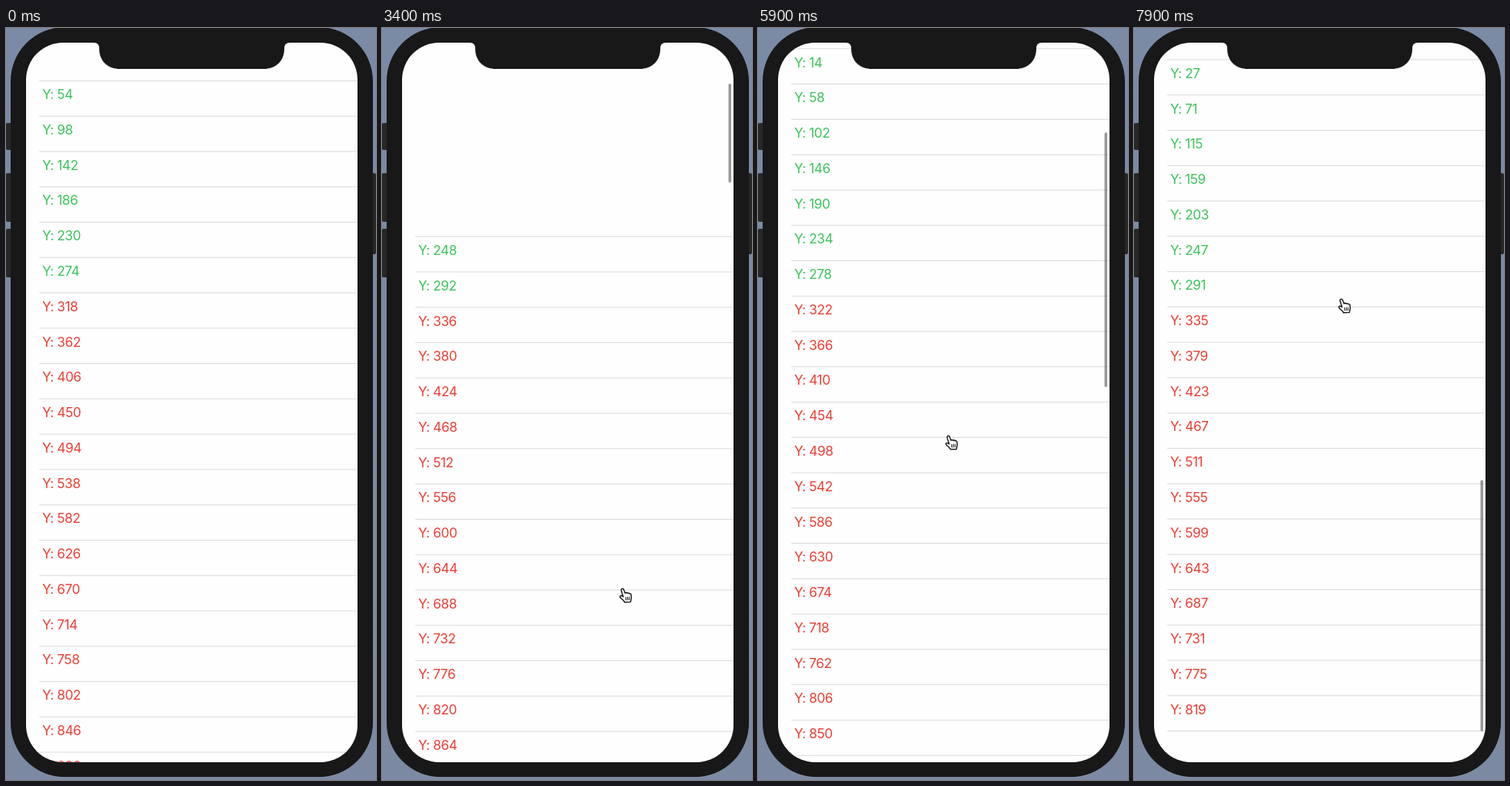
Write an HTML page with a canvas that moves like this. It is 480 px wide and 974 px high and loops after 8 s.

```html
<!DOCTYPE html>
<html lang="en">
<head>
<meta charset="utf-8">
<title>Scroll positions</title>
<style>
  html, body { margin: 0; width: 100%; height: 100%; overflow: hidden; background: #7b8ba4; }
  canvas { display: block; width: 480px; height: 974px; }
</style>
</head>
<body>
<canvas id="stage"></canvas>
<script>
const W = 480, H = 974, LOOP = 8000, STEP = 100;
const PT = 1.0402;                       // pixels per point
const SCREEN = { x: 26, y: 19, w: 430, h: 932, r: 48 };
const ROWS = 50, ROW = 44, FIRST = 54, LIMIT = 300;
const MAX = 1386, VIEW = 818;
const OMEGA = 8.58;                      // bounce stiffness
const BAR = { top: 72, bottom: 911, len: 330 };
const GRAB = 254, FLICK = 716;           // cursor heights where drags begin

const canvas = document.getElementById('stage');
const ctx = canvas.getContext('2d');
const dpr = window.devicePixelRatio || 1;
canvas.width = W * dpr;
canvas.height = H * dpr;

const clamp = (v, a = 0, b = 1) => Math.min(b, Math.max(a, v));
const part = (t, a, b) => clamp((t - a) / (b - a));
const smooth = u => u * u * (3 - 2 * u);
const mix = (a, b, u) => a + (b - a) * u;
const rubber = x => VIEW * (1 - 1 / (x * 0.55 / VIEW + 1));

function hermite(a, b, va, vb, sec, u) {
  const u2 = u * u, u3 = u2 * u;
  return a * (2 * u3 - 3 * u2 + 1) + b * (3 * u2 - 2 * u3) +
    sec * (va * (u3 - 2 * u2 + u) + vb * (u3 - u2));
}

const pullY = t => mix(GRAB, 735, smooth(part(t, 1900, 3400)));

// Scroll offset in points; negative means pulled past the top.
function offsetAt(t) {
  if (t < 1900) return 0;
  if (t < 4000) return -rubber((pullY(t) - GRAB) / PT);
  if (t < 5450) {
    const k = OMEGA * (t - 4000) / 1000;
    const pull = 194 * (1 + k) * Math.exp(-k);
    return pull < 0.3 ? 0 : -pull;
  }
  if (t < 5900) return hermite(0, 172, 0, 400, 0.45, part(t, 5450, 5900));
  if (t < 6283) return hermite(172, 410, 400, 2054, 0.383, part(t, 5900, 6283));
  const glide = 1437 - 545.4 * Math.exp(-2 * (t - 6600) / 1000);
  if (glide < MAX) return glide;
  const s = (t - 7785) / 1000;
  return MAX + 102 * s * Math.exp(-OMEGA * s);
}

function cursorAt(t) {
  if (t < 1000 || (t >= 4100 && t < 5100)) return null;
  if (t < 1900) {
    const u = smooth(part(t, 1500, 1900));
    return [mix(246, 250, u), mix(223, GRAB, u)];
  }
  if (t < 4100) return [mix(250, 316, smooth(part(t, 1900, 3400))), pullY(t)];
  if (t < 6283) {
    const x = t < 5900 ? mix(258, 251, part(t, 5450, 5900)) : mix(251, 241, part(t, 5900, 6283));
    return [x, FLICK - offsetAt(t) * PT];
  }
  const u = smooth(part(t, 6700, 7700));
  return [mix(241, 273, u), mix(289, 360, u)];
}

function barAlpha(t) {
  if (t < 1900) return 0;
  if (t < 5450) return 1 - part(t, 5000, 5300);
  return 1;
}

function box(x, y, w, h, r, color) {
  ctx.beginPath();
  ctx.roundRect(x, y, w, h, r);
  ctx.fillStyle = color;
  ctx.fill();
}

function drawBody() {
  const sky = ctx.createLinearGradient(0, 0, 0, H);
  sky.addColorStop(0, '#7a8ba6');
  sky.addColorStop(1, '#7b8aa2');
  ctx.fillStyle = sky;
  ctx.fillRect(0, 0, W, H);
  for (const [x, y, h] of [[0, 123, 35], [0, 188, 63], [0, 260, 63], [472, 188, 105]])
    box(x, y, 8, h, 2, '#272727');
  box(6, -1, 470, 971, 70, '#181818');
}

function drawNotch() {
  ctx.beginPath();
  ctx.moveTo(114, 18);
  ctx.lineTo(114, 19);
  ctx.quadraticCurveTo(121, 19, 121, 27);
  ctx.bezierCurveTo(121, 43, 132, 53, 148, 53);
  ctx.lineTo(334, 53);
  ctx.bezierCurveTo(350, 53, 361, 43, 361, 27);
  ctx.quadraticCurveTo(361, 19, 368, 19);
  ctx.lineTo(368, 18);
  ctx.closePath();
  ctx.fillStyle = '#181818';
  ctx.fill();
}

function drawList(offset) {
  ctx.font = '17.2px Inter, "Liberation Sans", sans-serif';
  ctx.letterSpacing = '-0.4px';
  ctx.textBaseline = 'alphabetic';
  for (let i = 0; i <= ROWS; i++) {
    const y = FIRST + i * ROW - offset;
    if (y < -40 || y > 910) continue;
    const line = SCREEN.y + (y - 6.5) * PT;
    ctx.fillStyle = '#dadadc';
    ctx.fillRect(43, line - 0.5, 413, 1);
    if (i === ROWS) continue;
    const value = Math.trunc(y + 0.01);
    ctx.fillStyle = value < LIMIT ? '#3cc35b' : '#ec3e34';
    ctx.fillText('Y: ' + value, 47, SCREEN.y + (y + 10.3) * PT + 6.3);
  }
}

function drawBar(offset, alpha) {
  if (!alpha) return;
  const over = Math.max(-offset, offset - MAX, 0) * PT;
  const len = BAR.len - over;
  const travel = BAR.bottom - BAR.top - len;
  const y = BAR.top + travel * clamp(offset / MAX);
  ctx.globalAlpha = alpha;
  box(449.5, y, 3.5, len, 1.75, 'rgba(0,0,0,0.4)');
  ctx.globalAlpha = 1;
}

const hand = new Path2D(
  'M-5.4-8.2C-4.3-9.3-3-8.9-2.4-7.6L-.6-2.9C-.2-4 1.5-4.1 2-2.8' +
  'C2.7-3.7 4.2-3.5 4.6-2.3C5.6-2.9 6.9-2.2 7.1-.9L7.5 2.4' +
  'C7.6 4.3 6.7 5.5 6.5 8.4L-1.2 8.8C-1.6 6.8-4.2 5.2-6.3 3.2' +
  'C-7.8 1.8-7.4.4-6.1.3C-5 .2-4 1.1-3 1.7L-5.6-6.2C-5.9-7-5.9-7.7-5.4-8.2Z');
const knuckles = new Path2D('M.2 2.2L.7 6M2.5 2.1L2.8 5.9M4.7 2L4.8 5.7');

function drawCursor(pos) {
  if (!pos) return;
  ctx.save();
  ctx.translate(pos[0], pos[1]);
  ctx.lineJoin = ctx.lineCap = 'round';
  ctx.lineWidth = 3;
  ctx.strokeStyle = 'rgba(255,255,255,0.7)';
  ctx.stroke(hand);
  ctx.fillStyle = '#fff';
  ctx.fill(hand);
  ctx.strokeStyle = '#111';
  ctx.lineWidth = 1.4;
  ctx.stroke(hand);
  ctx.lineWidth = 1;
  ctx.stroke(knuckles);
  ctx.restore();
}

function draw(t) {
  const offset = offsetAt(t);
  ctx.setTransform(dpr, 0, 0, dpr, 0, 0);
  drawBody();
  ctx.save();
  box(SCREEN.x, SCREEN.y, SCREEN.w, SCREEN.h, SCREEN.r, '#fefefe');
  ctx.clip();
  drawList(offset);
  drawBar(offset, barAlpha(t));
  ctx.restore();
  drawNotch();
  drawCursor(cursorAt(t));
}

const start = performance.now();
function tick() {
  const t = (performance.now() - start) % LOOP;
  draw(Math.floor(t / STEP) * STEP);
  requestAnimationFrame(tick);
}
tick();
</script>
</body>
</html>
```
